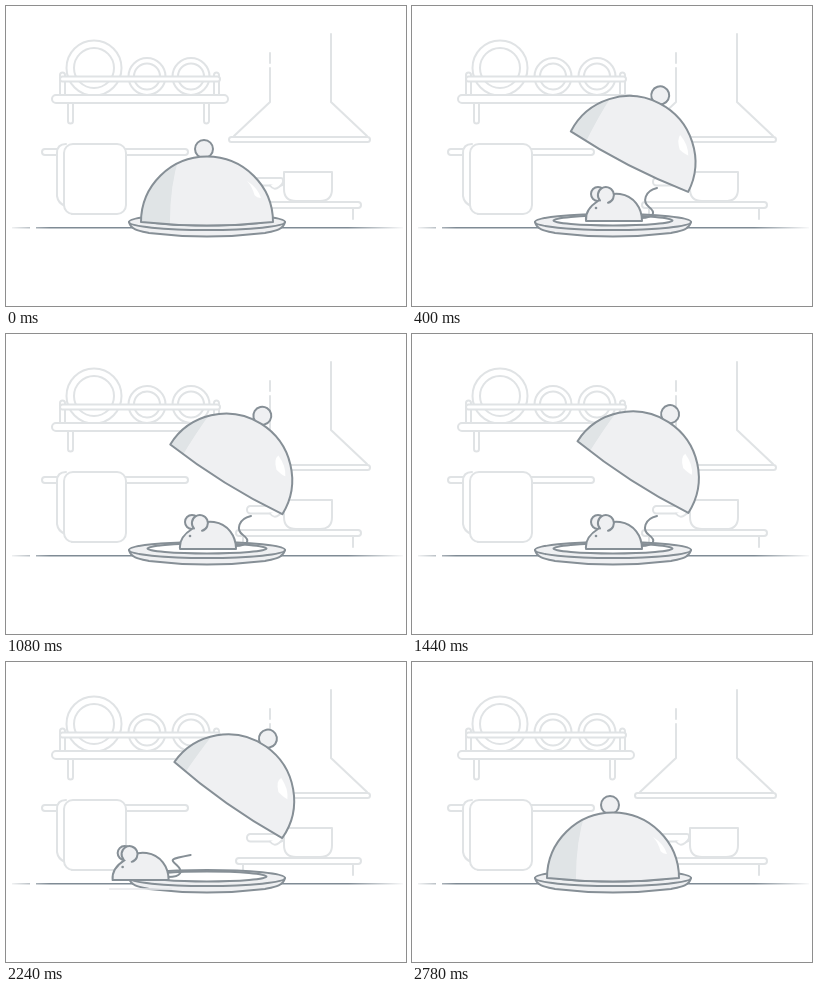
An HTML page for the animation above (3.26 s loop, 400x300 px).

```html
<!DOCTYPE html>
<html lang="en">
<head>
<meta charset="utf-8">
<title>Dinner under the dome</title>
<style>
  html, body { margin: 0; width: 100%; height: 100%; overflow: hidden; background: #fff; }
  svg { display: block; width: 100%; height: 100%; }
  .kitchen { fill: #fff; stroke: #e0e3e5; stroke-width: 2; }
  .ink { fill: #eff0f2; stroke: #868f96; stroke-width: 2; }
  g { stroke-linecap: round; stroke-linejoin: round; }
  .line { fill: none; }
</style>
</head>
<body>
<svg viewBox="0 0 400 300">
  <defs>
    <linearGradient id="tableInk" gradientUnits="userSpaceOnUse" x1="5" x2="397" y1="0" y2="0">
      <stop offset="0" stop-color="#7f8b95" stop-opacity=".1"/>
      <stop offset=".1" stop-color="#7f8b95"/>
      <stop offset=".86" stop-color="#7f8b95"/>
      <stop offset="1" stop-color="#7f8b95" stop-opacity=".05"/>
    </linearGradient>
    <linearGradient id="fade" gradientUnits="userSpaceOnUse" x1="8" x2="56" y1="0" y2="0">
      <stop offset="0" stop-color="#000"/>
      <stop offset="1" stop-color="#fff"/>
    </linearGradient>
    <mask id="exit" maskUnits="userSpaceOnUse" x="0" y="0" width="400" height="300">
      <rect width="400" height="300" fill="url(#fade)"/>
    </mask>
    <path id="shell" d="M-66 0A66 65.5 0 0 1 66 0Q0 7 -66 0Z"/>
    <clipPath id="inShell"><use href="#shell"/></clipPath>
  </defs>

  <g class="kitchen">
    <!-- dish rack -->
    <circle cx="88" cy="62" r="27.5"/><circle cx="88" cy="62" r="20"/>
    <circle cx="141" cy="70.5" r="18.5"/><circle cx="141" cy="70.5" r="13"/>
    <circle cx="185" cy="70.5" r="18.5"/><circle cx="185" cy="70.5" r="13"/>
    <path d="M54 89V69a2.5 2.5 0 0 1 5 0V89M208 89V69a2.5 2.5 0 0 1 5 0V89"/>
    <rect x="54" y="70.5" width="160" height="5" rx="2.5"/>
    <path d="M62 97V115a2.5 2.5 0 0 0 5 0V97M198 97V115a2.5 2.5 0 0 0 5 0V97"/>
    <rect x="46" y="89" width="176" height="8" rx="4"/>
    <!-- towel -->
    <rect x="36" y="143" width="146" height="6" rx="3"/>
    <path d="M60 138Q51 138 51 147V190Q52 197 59 200L66 208"/>
    <rect x="58" y="138" width="62" height="70" rx="9"/>
    <!-- hood -->
    <path class="line" d="M325 28V96L361 130M264 47V57M264 62V96L228 130"/>
    <rect x="223" y="131" width="141" height="5" rx="2.5"/>
    <!-- pan shelf -->
    <rect x="241" y="172" width="37" height="7.5" rx="3.5"/>
    <path d="M264 179.500Q268 185 273 181T277 174"/>
    <path d="M278 166H326V183Q326 195 314 195H290Q278 195 278 183Z"/>
    <path class="line" d="M347 203V213M237 203V208"/>
    <rect x="230" y="196" width="125" height="6" rx="3"/>
  </g>

  <path d="M6 221H24V222.600H6ZM30 221H397V222.600H30Z" fill="url(#tableInk)"/>

  <g class="ink">
    <path d="M123 216C125 224 133 225 143 227Q201 234 259 227C269 225 277 224 279 216Z"/>
    <ellipse cx="201" cy="216" rx="78" ry="8"/>
    <ellipse cx="201" cy="214.500" rx="59.500" ry="5" fill="#fff"/>
    <ellipse id="gloom" cx="201" cy="214.500" rx="59.500" ry="5" fill="#b5bcc2"/>
  </g>

  <g mask="url(#exit)">
    <path id="streak" d="M0 227H62" stroke="#e6e8ea" stroke-width="1.500"/>
    <g id="mouse" class="ink">
      <path id="tail" class="line"/>
      <circle cx="12" cy="-27" r="7"/>
      <path d="M0 0C-1 -9 4 -15 12 -20C20 -27 27 -28 34 -27C48 -25 56 -13 56 0Z"/>
      <path id="ear" d="M-6 5.500A8 8 0 1 1 2 7.800"/>
      <circle cx="10" cy="-13" r="1.300" fill="#868f96" stroke="none"/>
    </g>
  </g>

  <g id="dome" class="ink">
    <circle cx="-3" cy="-73" r="9"/>
    <use href="#shell" stroke="none"/>
    <g clip-path="url(#inShell)" stroke="none">
      <path id="shade" fill="#e0e4e6"/>
      <path id="shine" fill="#fff"/>
    </g>
    <use href="#shell" fill="none"/>
  </g>
</svg>
<script>
const LOOP = 3260, CLOSE = 2240, SWING = 420;
const $ = id => document.getElementById(id);
const clamp = v => Math.min(1, Math.max(0, v));
const ramp = (t, from, to) => clamp((t - from) / (to - from));
const inOut = u => u < .5 ? 4 * u ** 3 : 1 - 4 * (1 - u) ** 3;
const set = (id, attrs) => {
  for (const key in attrs) $(id).setAttribute(key, attrs[key]);
};

// Quick swing open, slow creep, quick swing shut.
function lift(t) {
  const creep = 1 - Math.max(0, CLOSE - t) * 8.1e-5;
  return creep * inOut(ramp(t, 100, 100 + SWING)) * (1 - inOut(ramp(t, CLOSE, CLOSE + SWING)));
}

function drawDome(p) {
  set('dome', { transform: `translate(${201 + 21.3 * p} ${216 - 78 * p}) rotate(${35.2 * p})` });
  const foot = -37 - 14 * p, top = -26 - 22 * p;
  set('shade', { d: `M-70 8H${foot}Q${foot - 1} -38 ${top} -70H-70Z` });
  const bulge = 3 + 9 * p;
  set('shine', {
    d: `M40 -41Q51 -34 54 -24Q50 -24 ${49 - bulge / 2} -27Q${48 - bulge} -36 40 -41Z`,
    transform: `rotate(${-12 * p})`
  });
  set('gloom', { opacity: p < .02 ? 0 : ramp(p, .77, .45) });
}

function drawMouse(t) {
  const run = .0129 * Math.max(0, t - 1940) ** 1.5;
  const drop = Math.min(12, 11 * (run / 154) ** 1.55);
  const x = 174 - run;
  set('mouse', { transform: `translate(${x} ${215 + drop})` });
  set('ear', { transform: `translate(${20 - 3 * ramp(t, 1940, 2240) + 12 * ramp(t, 2240, 2460)} -26)` });
  const lean = Math.sin(Math.PI * ramp(t, 2000, 2480));
  const wag = Math.sin(t / 115);
  set('tail', {
    d: `M55 -3C${69 + wag} -3 ${70 + wag} -9 ${63 + lean} ${-14 - lean}` +
       `S${58 - wag} ${-30 + 9 * lean} ${71 + 7 * lean} ${-33 + 8 * lean}`
  });
  set('streak', { transform: `translate(${x - 3} 0)`, opacity: ramp(run, 30, 67) * ramp(run, 150, 90) });
}

function draw(now) {
  const t = now % LOOP;
  drawDome(lift(t));
  drawMouse(t);
}

const start = performance.now();
function tick() {
  draw(performance.now() - start);
  requestAnimationFrame(tick);
}
tick();
</script>
</body>
</html>
```
